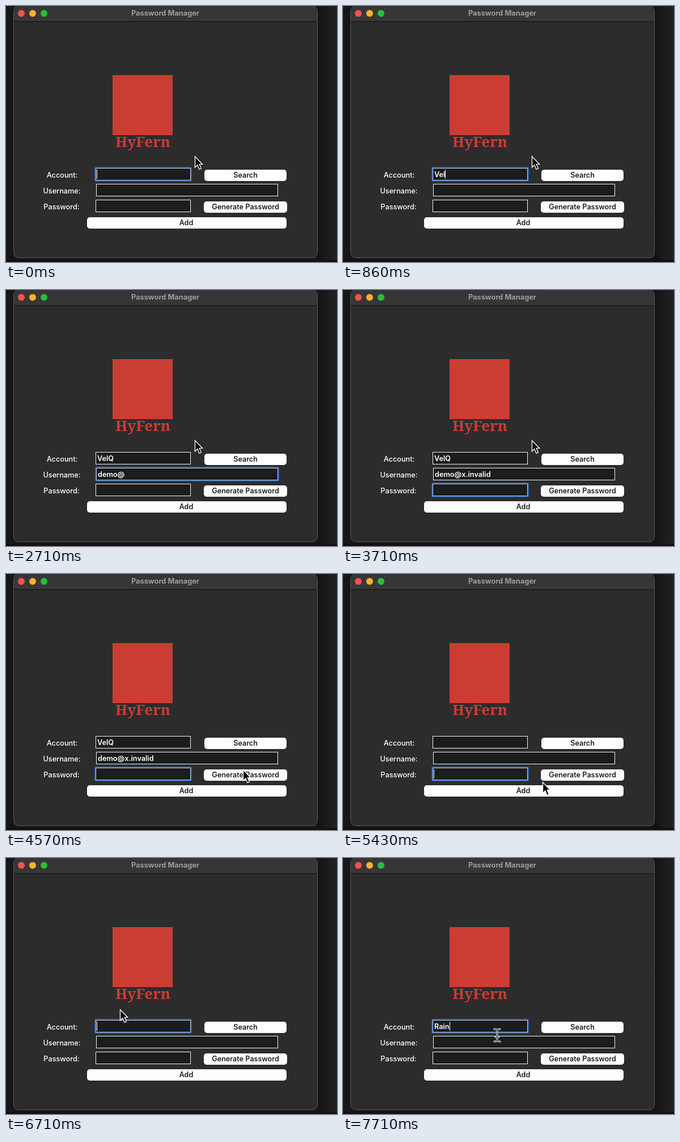
Write an HTML page that moves like this. It is 584x452 px and loops after 8000 ms.

```html
<!DOCTYPE html>
<html lang="en">
<head>
<meta charset="utf-8">
<title>Password Manager</title>
<style>
  html, body { margin: 0; width: 100%; height: 100%; overflow: hidden; background: #1f1f1f; }
  svg { display: block; width: 584px; height: 452px; }
  text { font: 500 12.7px Inter, "Open Sans", sans-serif; fill: #fff; white-space: pre; }
  .title { font-weight: 700; font-size: 12.8px; fill: #9c9c9c; }
  .brand { font: 900 26px "Noto Serif", "Liberation Serif", serif; fill: #cb3d32; }
  .button text { fill: #000; }
  .button rect { fill: #fff; }
  .mid { text-anchor: middle; }
  .field .box { fill: #1c1c1c; stroke: #f4f4f4; }
  .field .ring { fill: none; stroke: #2b5eaa; stroke-width: 2; visibility: hidden; }
  .field .caret { fill: #fff; visibility: hidden; }
  .field text { font-weight: 600; }
  .focus .box { stroke: #b9d2f4; }
  .focus .ring { visibility: visible; }
</style>
</head>
<body>
<svg id="stage" viewBox="0 0 584 452">
  <defs>
    <linearGradient id="shade">
      <stop offset="0" stop-color="#131313"/>
      <stop offset="1" stop-color="#222"/>
    </linearGradient>
  </defs>
  <rect width="584" height="452" fill="#171717"/>
  <rect x="550" width="34" height="452" fill="url(#shade)"/>
  <rect y="448" width="584" height="4" fill="#171012"/>
  <rect x="13.5" y="-0.5" width="536" height="445" rx="9" fill="#2c2c2c" stroke="#595959"/>
  <path d="M14 27V8Q14 0 22 0H541Q549 0 549 8V27Z" fill="#363636"/>
  <rect x="14" y="27" width="535" height="1" fill="#0c0c0c"/>
  <circle cx="27" cy="13" r="6" fill="#fe5150"/>
  <circle cx="47" cy="13" r="6" fill="#feb129"/>
  <circle cx="67" cy="13" r="6" fill="#27c03a"/>
  <text class="title mid" x="281" y="17">Password Manager</text>

  <rect x="188" y="122" width="106" height="106" fill="#cb3d32"/>
  <text class="brand mid" x="241.5" y="249">HyFern</text>

  <text class="mid" x="99" y="303">Account:</text>
  <text class="mid" x="98.5" y="331">Username:</text>
  <text class="mid" x="98" y="359">Password:</text>
  <g id="form"></g>
  <g id="arrow">
    <path d="M.5 .8V19.8L4.8 15.8L8 23.3L11.4 21.8L8.2 14.4H13.6Z" fill="#080808" stroke="#f2f2f2" stroke-width="1.4"/>
  </g>
  <g id="beam" fill="none" stroke-linecap="round">
    <path id="bar" d="M-5 -11Q0 -11 0 -8Q0 -11 5 -11M0 -8V8M-5 11Q0 11 0 8Q0 11 5 11M-3 3H3" stroke="#e6e6e6" stroke-width="3.2"/>
    <use href="#bar" style="display:none"/>
    <path d="M-5 -11Q0 -11 0 -8Q0 -11 5 -11M0 -8V8M-5 11Q0 11 0 8Q0 11 5 11M-3 3H3" stroke="#222" stroke-width="1.1"/>
  </g>
</svg>
<script>
const LOOP = 8000;
const form = document.getElementById('form');
const arrow = document.getElementById('arrow');
const beam = document.getElementById('beam');

function add(parent, tag, attrs, text) {
  const el = document.createElementNS('http://www.w3.org/2000/svg', tag);
  for (const key in attrs) el.setAttribute(key, attrs[key]);
  if (text) el.textContent = text;
  parent.append(el);
  return el;
}

function button(x, y, width, label) {
  const g = add(form, 'g', { class: 'button' });
  add(g, 'rect', { x, y, width, height: 20, rx: 5 });
  add(g, 'text', { x: label === 'Add' ? 318 : x + width / 2, y: y + 14, class: 'mid' }, label);
}

function field(x, y, width) {
  const g = add(form, 'g', { class: 'field' });
  add(g, 'rect', { class: 'ring', x: x - 1, y: y - 1, width: width + 2, height: 24, rx: 1.5 });
  add(g, 'rect', { class: 'box', x: x + .5, y: y + .5, width: width - 1, height: 21 });
  const text = add(g, 'text', { x: x + 3, y: y + 16 });
  const caret = add(g, 'rect', { class: 'caret', y: y + 3, width: 1, height: 16 });
  return { g, text, caret, x };
}

const fields = {
  account: field(158, 286, 168),
  user: field(159, 314, 321),
  pass: field(158, 342, 168)
};
button(350, 289, 145, 'Search');
button(349, 345, 147, 'Generate Password');
button(143, 373, 352, 'Add');

// [step, field, blink phase]
const focus = [
  [0, 'account', 0], [11, 'user', 3], [25, 'pass', 2],
  [36, 'pass', 0], [44, 'account', 1]
];

// [step, text]
const typed = {
  account: [[0, ''], [2, 'V'], [4, 'Ve'], [6, 'Vel'], [8, 'VelQ'], [37, ''],
    [51, 'R'], [52, 'Ra'], [53, 'Rai'], [54, 'Rain']],
  user: [[0, ''], [14, 'd'], [15, 'de'], [16, 'dem'], [17, 'demo'], [19, 'demo@'],
    [20, 'demo@x'], [21, 'demo@x.in'], [22, 'demo@x.inva'], [23, 'demo@x.inval'],
    [24, 'demo@x.invalid'], [37, '']],
  pass: [[0, '']]
};

// [step, x, y]
const path = [
  [0, 333, 265], [27, 333, 265], [32, 418, 345], [33, 418, 345],
  [36, 357, 372], [37, 357, 372], [38, 352, 367], [42, 200, 296],
  [44, 200, 296], [46, 201, 267], [48, 201, 267], [51, 272, 313], [56, 272, 313]
];

const rowAt = (rows, step) => rows.filter(row => row[0] <= step).pop();

function pointer(step) {
  const i = path.findIndex(row => row[0] > step);
  const [a, ax, ay] = path[i - 1];
  const [b, bx, by] = path[i];
  const p = (step - a) / (b - a);
  const e = p * p * (3 - 2 * p);
  return [ax + (bx - ax) * e, ay + (by - ay) * e];
}

function draw(time) {
  // Seven steps a second, on a 10 ms grid
  const step = Math.floor((Math.floor(time / 10) + .5) * .07);
  const [, active, phase] = rowAt(focus, step);
  for (const name in fields) {
    const { g, text, caret, x } = fields[name];
    const on = name === active;
    text.textContent = rowAt(typed[name], step)[1];
    g.classList.toggle('focus', on);
    const width = text.textContent ? text.getComputedTextLength() : -1;
    caret.setAttribute('x', Math.round(x + 3 + width));
    caret.style.visibility = on && (step + phase) % 6 < 4 ? 'visible' : 'hidden';
  }
  const [x, y] = pointer(step);
  const inField = (step >= 41 && step < 46) || step >= 50;
  arrow.style.display = inField ? 'none' : '';
  beam.style.display = inField ? '' : 'none';
  for (const el of [arrow, beam]) el.setAttribute('transform', `translate(${x} ${y})`);
}

const start = performance.now();
function tick() {
  draw((performance.now() - start) % LOOP);
  requestAnimationFrame(tick);
}
tick();
</script>
</body>
</html>
```
